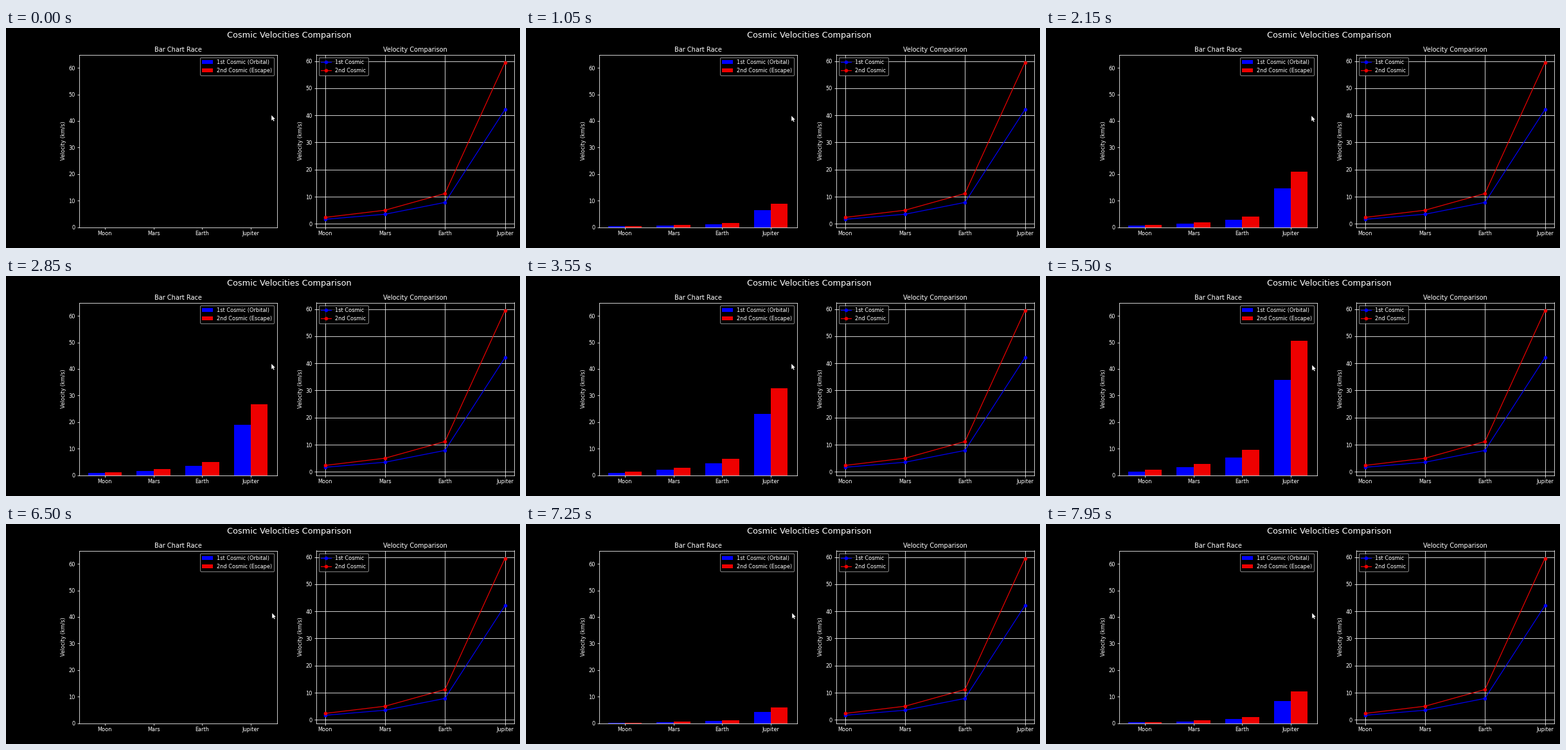
Write a matplotlib script that moves like this. It is 800 px wide and 343 px high and loops after 8 s.

```python
import numpy as np
import matplotlib.pyplot as plt
from matplotlib.animation import FuncAnimation
from matplotlib.patches import Polygon

W, H, DPI = 800, 343, 64
FRAME_MS, LOOP_MS = 50, 8000
K = 0.909  # scale from default point sizes to this stage

RED, BLUE = "#ee0000", "#0000fc"
PLANETS = ["Moon", "Mars", "Earth", "Jupiter"]
FIRST = np.array([1.68, 3.55, 7.91, 42.1])
SECOND = np.array([2.38, 5.03, 11.19, 59.5])
STEPS = 20
BAR_W = 0.35

# Moments at which the bars grow one step, before and after the reset
GROW = [200, 500, 850, 1150, 1500, 1850, 2150, 2500, 2850, 3250,
        3550, 3800, 4100, 4550, 4850, 5150, 5500, 5850, 6250]
RESET = 6500
REGROW = [6800, 7150, 7500, 7850]

plt.style.use("dark_background")
plt.rcParams.update({
    "font.family": "DejaVu Sans",
    "font.size": 10 * K,
    "axes.titlesize": 12 * K,
    "axes.titlepad": 6 * K,
    "axes.labelpad": 4 * K,
    "axes.linewidth": 0.9,
    "grid.linewidth": 0.9,
    "lines.linewidth": 1.5 * K,
    "lines.markersize": 6 * K,
    "lines.markeredgewidth": K,
    "patch.linewidth": K,
    "xtick.major.size": 3.5 * K,
    "ytick.major.size": 3.5 * K,
    "xtick.major.width": 0.9,
    "ytick.major.width": 0.9,
    "xtick.major.pad": 3.5 * K,
    "ytick.major.pad": 3.5 * K,
})

fig = plt.figure(figsize=(W / DPI, H / DPI), dpi=DPI, facecolor="black")


def add_axes(left, right, title, top=41.5, bottom=310.5):
    box = [left / W, 1 - bottom / H, (right - left) / W, (bottom - top) / H]
    ax = fig.add_axes(box, facecolor="black")
    ax.set_title(title)
    ax.set_ylabel("Velocity (km/s)")
    return ax


fig.text(440.5 / W, 1 - 15.5 / H, "Cosmic Velocities Comparison",
         size=16 * K, ha="center", va="baseline")

# Growing bars
race = add_axes(113.5, 421.5, "Bar Chart Race")
x = np.arange(len(PLANETS))
bars1 = race.bar(x - BAR_W / 2, FIRST, BAR_W, color=BLUE,
                 label="1st Cosmic (Orbital)")
bars2 = race.bar(x + BAR_W / 2, SECOND, BAR_W, color=RED,
                 label="2nd Cosmic (Escape)")
race.set_xlim(-0.535, 3.535)
race.set_ylim(0, 65)
race.set_xticks(x, PLANETS)
race.legend(loc="upper right")

# Static line chart
lines = add_axes(482.5, 790.5, "Velocity Comparison")
lines.plot(PLANETS, FIRST, "o-", color=BLUE, label="1st Cosmic")
lines.plot(PLANETS, SECOND, "o-", color=RED, label="2nd Cosmic")
lines.grid(True)
lines.legend(loc="upper left")

# Mouse pointer, in pixels from the top left corner
ARROW = np.array([(0, 0), (0, 8.2), (1.9, 6.5), (3.2, 9.4),
                  (4.5, 8.8), (3.2, 6), (5.6, 5.8)])
pointer = Polygon(ARROW, closed=True, fc="white", ec="none",
                  transform=None, zorder=10)
fig.add_artist(pointer)


def step_at(t):
    times = GROW if t < RESET else REGROW
    return sum(t >= moment for moment in times)


def pointer_at(t):
    if t < 50:
        return 413.2, 136
    return (413.2, 137) if t < 4850 else (414.2, 139)


def update(i):
    t = i * FRAME_MS
    part = step_at(t) / STEPS
    for bars, speeds in ((bars1, FIRST), (bars2, SECOND)):
        for bar, speed in zip(bars, speeds):
            bar.set_height(speed * part)
    px, py = pointer_at(t)
    pointer.set_xy(np.column_stack([px + ARROW[:, 0], H - py - ARROW[:, 1]]))
    return [*bars1, *bars2, pointer]


anim = FuncAnimation(fig, update, frames=LOOP_MS // FRAME_MS,
                     interval=FRAME_MS, repeat=True)
plt.show()
```
